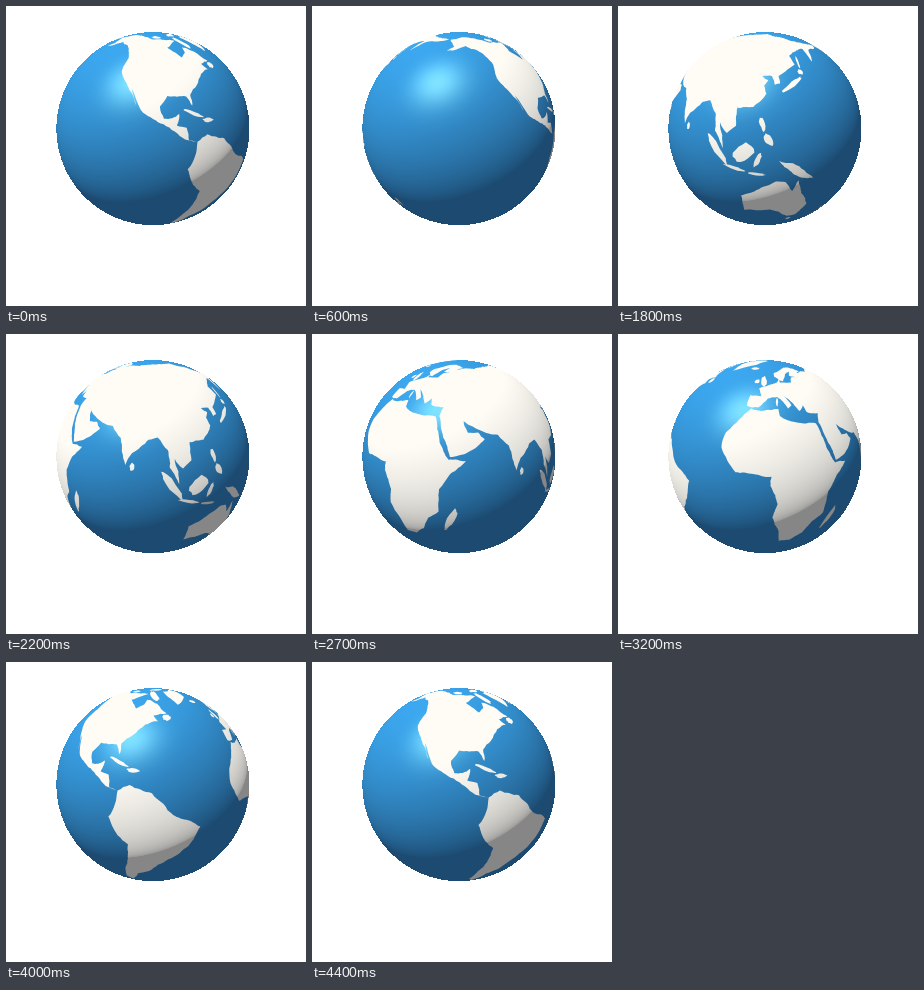
Recreate the animation shown at these times as an HTML page with a canvas. Size 300 px wide and 300 px high, loop 4.5 s.

```html
<!DOCTYPE html>
<html lang="en">
<head>
<meta charset="utf-8">
<title>Turning globe</title>
<style>
html, body { margin: 0; width: 100%; height: 100%; overflow: hidden; background: #fff; }
canvas { display: block; width: 300px; height: 300px; }
</style>
</head>
<body>
<canvas id="stage" width="300" height="300"></canvas>
<script>
const SIZE = 300, STEPS = 45, STEP_MS = 100;
const CX = 146.9, CY = 122.6, R = 96.5;
const EYE = 4;                        // viewer distance in globe radii
const ZOOM = Math.sqrt(EYE * EYE - 1);
const RAD = Math.PI / 180;
const TILT = 13.5 * RAD, ROLL = 6 * RAD;
const LIGHT = [-0.352, 0.755, 0.55];

const ctx = document.getElementById('stage').getContext('2d');

// Key points of each coast, as "longitude latitude"
const COASTS = {
  northAmerica: '-168 66,-156 71,-128 70,-95 68.5,-82 69,-94 60,-82 53,-77 57,-77 62,-65 59,-56 52,-66 49.5,-62 46,-70 43,-76 36,-81 31,-80.3 25.5,-83.5 30,-94 29.5,-97.5 24,-95 18.5,-91 19,-87.5 21.3,-88.5 15.8,-83.5 15,-82 9,-77.5 8.5,-84 9.5,-95 16,-105.5 20.3,-114 31,-109.7 23.2,-117 32.5,-124 40,-124 48,-135 58,-147 61,-163 55,-158 59',
  greenland: '-60 76,-53 68,-44 60,-24 70,-18 81,-35 83.5',
  southAmerica: '-77.5 8.5,-72 12,-61 9.5,-50 0,-35 -6,-39 -17,-48 -26,-57 -37,-65 -42,-69 -52,-70 -55.5,-75 -50,-73.5 -38,-70.5 -18.5,-76 -14,-81 -5,-78 2',
  africa: '-6 35.8,10 37.2,11 33.5,20 31,32.5 31,37.5 19,43 11.5,51.2 11.8,40 -3,40.5 -15,35 -20,32 -28,26 -34,19 -34.5,12 -17,13.5 -9,9 0,9 4.5,-8 4.4,-17 14.7,-16.5 22,-9.8 31',
  europe: '-9 37,-9 43.3,-1.5 43.5,-4.5 48.3,8.5 54,10.5 57.5,11 54.2,21 55,23 59.5,30 60,21.5 61,24 65.5,17.5 62,14 55.5,6 58.5,5 62,19 70,28 71,41 67,34 65,44 67.5,60 69,60 40,36 36.5,27.5 37,26 40.5,23 37,19.5 41,13.5 45,18.3 40,16 38,9 44,3 42.5,-2 36.8',
  asia: '58 69,73 72.5,104 77.5,140 72.5,190 66,163 60,157 51,156 61,137 54,140 48,128 40,129 36,126 35,124 39.5,118 39,122 37,120 34,121.8 30,116 22.8,108 21.5,109 13,105 9,100.5 13.3,103.8 1.4,98.5 9,97 17,91.5 22.5,87 21,80 14,77.5 8,73 20,67 25,57 26.8,48.5 30.3,34 37.5,46 42',
  arabia: '34.5 31.5,36 38,48.5 32.5,48.5 29,51 25,56.3 25.5,59.8 22.5,52 16,43.5 12.8,38.8 21.5',
  newGuinea: '131 -1,138 -2,150.5 -10,142 -9,134 -4',
  australia: '114 -23,115.5 -34.3,124 -33,131 -31.6,138 -34.5,144 -38.5,150 -37.5,153 -28,146 -19,142.5 -11,140.5 -17.5,136 -12.2,131 -12,122 -18'
};

// Islands as ellipses: longitude, latitude, length, width, angle
const ISLANDS = {
  baffin: [-73, 68, 20, 6, -30],
  ellesmere: [-78, 79, 26, 6, 10],
  victoria: [-110, 71, 15, 4, 0],
  newfoundland: [-56, 49, 6, 4, 0],
  cuba: [-79.5, 21.8, 11, 1.6, -17],
  hispaniola: [-71.3, 18.9, 6, 2, 0],
  iceland: [-19, 65, 10, 3, 0],
  britain: [-2.5, 54, 9, 4, 110],
  ireland: [-8, 53.3, 4, 3, 0],
  sardinia: [9, 41, 5, 1.3, 90],
  madagascar: [46.8, -19, 14, 4, 70],
  ceylon: [80.8, 7.5, 3.5, 2, 90],
  sumatra: [101, 0, 16, 3.6, -47],
  java: [110, -7.3, 10, 1.7, -8],
  sunda: [121, -8.8, 9, 1.4, 0],
  borneo: [114, 1, 11, 8, 45],
  sulawesi: [121, -1.8, 7, 2.5, 70],
  luzon: [121.5, 15.5, 7, 2.3, -65],
  mindanao: [125, 8.5, 6, 3.4, -50],
  honshu: [137, 36.3, 14, 2.8, 35],
  hokkaido: [143, 43.5, 4, 3, 0],
  sakhalin: [143, 50, 8, 1.6, 95],
  tasmania: [146.8, -42, 3, 3, 0],
  northIsland: [175.7, -38.5, 7, 3, -55],
  southIsland: [170.3, -43.8, 8, 2.6, 45]
};

let seed = 7;
function random() {
  seed = (seed * 16807) % 2147483647;
  return seed / 2147483647;
}

// Midpoint displacement gives a long edge the look of a coast
function roughen(a, b) {
  const dx = b[0] - a[0], dy = b[1] - a[1];
  if (Math.hypot(dx, dy) < 2) return [a];
  const shift = (random() - 0.5) * 0.14;
  const mid = [(a[0] + b[0]) / 2 - dy * shift, (a[1] + b[1]) / 2 + dx * shift];
  return [...roughen(a, mid), ...roughen(mid, b)];
}

function coast(text) {
  const pts = text.split(',').map(p => p.split(' ').map(Number));
  return pts.flatMap((p, i) => roughen(p, pts[(i + 1) % pts.length]));
}

function island([lon, lat, length, width, angle]) {
  const c = Math.cos(angle * RAD), s = Math.sin(angle * RAD);
  return Array.from({ length: 16 }, (_, i) => {
    const turn = i * Math.PI / 8, size = 0.42 + 0.18 * random();
    const u = length * size * Math.cos(turn), v = width * size * Math.sin(turn);
    return [lon + u * c - v * s, lat + u * s + v * c];
  });
}

const land = [...Object.values(COASTS).map(coast), ...Object.values(ISLANDS).map(island)];

const dot = (a, b) => a[0] * b[0] + a[1] * b[1] + a[2] * b[2];

// Surface normal under a pixel, or null beside the globe
function normalAt(px, py) {
  const x = (px + 0.5 - CX) / R, y = (CY - py - 0.5) / R;
  const q = (x * x + y * y) / (ZOOM * ZOOM);
  const root = q * q * EYE * EYE - (1 + q) * (q * EYE * EYE - 1);
  if (root < 0) return null;
  const z = (q * EYE + Math.sqrt(root)) / (1 + q);
  const k = (EYE - z) / ZOOM;
  return [x * k, y * k, z];
}

function seaColor(light, shine) {
  const d = light ** 0.8;
  return [28 + 32 * d + 72 * shine, 74 + 94 * d + 72 * shine, 112 + 128 * d + 40 * shine];
}

function landColor(light) {
  const d = Math.min(1, 1.15 * light ** 0.4);
  return [134 + 120 * d, 134 + 118 * d, 134 + 110 * d];
}

// A lit globe of one material, used as a fill
function litGlobe(color) {
  const sheet = document.createElement('canvas');
  sheet.width = sheet.height = SIZE;
  const pen = sheet.getContext('2d');
  const image = pen.createImageData(SIZE, SIZE);
  for (let y = 0; y < SIZE; y++) {
    for (let x = 0; x < SIZE; x++) {
      const n = normalAt(x, y);
      if (!n) continue;
      const toEye = [-n[0], -n[1], EYE - n[2]];
      const facing = dot(n, LIGHT);
      const mirror = n.map((v, i) => 2 * facing * v - LIGHT[i]);
      const shine = Math.max(0, dot(mirror, toEye) / Math.hypot(...toEye)) ** 9;
      image.data.set([...color(Math.max(0, facing), shine), 255], (y * SIZE + x) * 4);
    }
  }
  pen.putImageData(image, 0, 0);
  return ctx.createPattern(sheet, 'no-repeat');
}

const seaFill = litGlobe(seaColor), landFill = litGlobe(landColor);

// Perspective view; points behind the horizon slide just past the rim
function project([lon, lat], center) {
  const f = lat * RAD, d = (lon - center) * RAD;
  const x = Math.cos(f) * Math.sin(d), depth = Math.cos(f) * Math.cos(d);
  const y = Math.sin(f) * Math.cos(TILT) - depth * Math.sin(TILT);
  const z = Math.sin(f) * Math.sin(TILT) + depth * Math.cos(TILT);
  const px = x * Math.cos(ROLL) + y * Math.sin(ROLL);
  const py = y * Math.cos(ROLL) - x * Math.sin(ROLL);
  const seen = z > 1 / EYE;
  const k = R * (seen ? ZOOM / (EYE - z) : 1.02 / Math.hypot(px, py));
  return { x: CX + px * k, y: CY - py * k, seen };
}

function draw(n) {
  const turn = 2 * Math.PI / STEPS;
  const center = -97 - 360 * n / STEPS + 4 * Math.cos((n - 17) * turn);
  ctx.fillStyle = '#fff';
  ctx.fillRect(0, 0, SIZE, SIZE);
  ctx.fillStyle = seaFill;
  ctx.fillRect(0, 0, SIZE, SIZE);
  ctx.fillStyle = landFill;
  for (const shape of land) {
    const pts = shape.map(p => project(p, center));
    if (!pts.some(p => p.seen)) continue;
    ctx.beginPath();
    pts.forEach(p => ctx.lineTo(p.x, p.y));
    ctx.fill();
  }
}

function tick() {
  draw(Math.floor(performance.now() / STEP_MS) % STEPS);
  requestAnimationFrame(tick);
}
tick();
</script>
</body>
</html>
```
